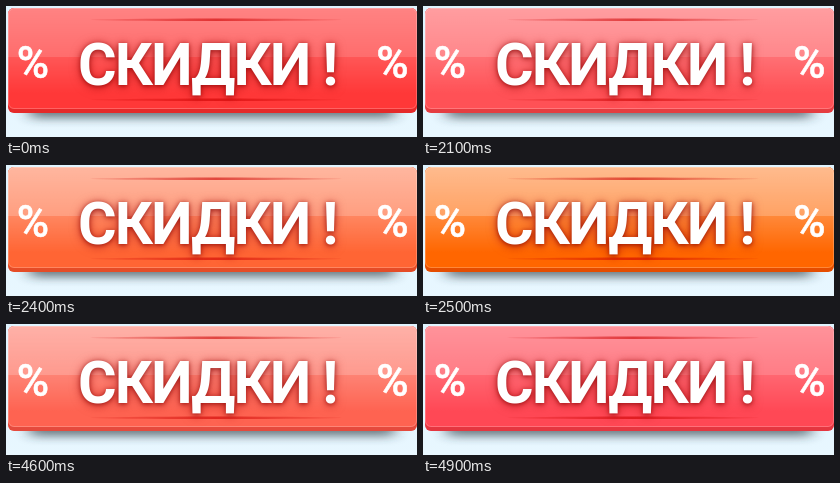
Animation of 411 by 131 pixels, one loop 5 s. Source, as an HTML page:

```html
<!DOCTYPE html>
<html lang="ru">
<head>
<meta charset="utf-8">
<style>
html, body { margin: 0; width: 100%; height: 100%; overflow: hidden; background: #e6f6ff; }
svg { display: block; width: 411px; height: 131px; }
text { font-family: Roboto, sans-serif; font-weight: 700; fill: #fff; }
.title { font-size: 59px; letter-spacing: -1.8px; filter: drop-shadow(0 1px 2px rgba(120, 0, 0, .6)) drop-shadow(0 1px 5px rgba(170, 0, 0, .6)); }
.sign { font-size: 44px; font-weight: 500; text-anchor: middle; stroke: #fff; stroke-width: .6px; }
</style>
</head>
<body>
<svg viewBox="0 0 411 131">
  <defs>
    <linearGradient id="page" x2="0" y2="1">
      <stop stop-color="#e0f4ff"/><stop offset="1" stop-color="#e8f7ff"/>
    </linearGradient>
    <linearGradient id="shine" x2="0" y2="1">
      <stop stop-color="#fff"/><stop offset=".49" stop-color="#fff" stop-opacity=".7"/>
      <stop offset=".49" stop-color="#fff" stop-opacity=".4"/><stop offset=".85" stop-color="#fff" stop-opacity="0"/>
    </linearGradient>
    <linearGradient id="line">
      <stop stop-color="#c00" stop-opacity=".1"/><stop offset=".5" stop-color="#c00" stop-opacity=".6"/>
      <stop offset="1" stop-color="#c00" stop-opacity=".1"/>
    </linearGradient>
    <filter id="soft" x="-10%" y="-150%" width="120%" height="400%"><feGaussianBlur stdDeviation="8 5"/></filter>
  </defs>
  <rect width="411" height="131" fill="url(#page)"/>
  <rect x="24" y="96" width="364" height="16" fill="#25343d" opacity=".65" filter="url(#soft)"/>
  <rect class="face" x="2" y="2" width="409" height="105" rx="6"/>
  <rect x="2" y="2" width="409" height="105" rx="6" fill="#900" opacity=".25"/>
  <rect class="face" x="2" y="2" width="409" height="101" rx="6"/>
  <rect id="gloss" x="2" y="2" width="409" height="101" rx="6" fill="url(#shine)"/>
  <rect x="2.5" y="2.5" width="408" height="100" rx="5.5" fill="none" stroke="#fff" stroke-opacity=".22"/>
  <ellipse cx="210" cy="13.8" rx="126" ry="1.2" fill="url(#line)"/>
  <ellipse cx="210" cy="93.8" rx="126" ry="1.2" fill="url(#line)"/>
  <text class="sign" x="27" y="71.5">%</text>
  <text class="sign" x="386.5" y="71.5">%</text>
  <text class="title" x="72" y="79">СКИДКИ !</text>
</svg>
<script>
const LOOP = 5000;
const shades = ['#ff3838', '#ff4855', '#ff5156', '#ff5b55', '#fe6351', '#ff6534', '#ff6600'];
// [time in ms, shade index]
const steps = [[0, 0], [2000, 1], [2100, 2], [2200, 3], [2300, 4], [2400, 5], [2500, 6],
  [4500, 5], [4600, 4], [4700, 3], [4800, 2], [4900, 1], [LOOP, 0]];

function play(element, styleFor) {
  element.animate(
    steps.map(([time, shade]) => ({ offset: time / LOOP, easing: 'steps(1, end)', ...styleFor(shade) })),
    { duration: LOOP, iterations: Infinity });
}

for (const face of document.querySelectorAll('.face')) play(face, shade => ({ fill: shades[shade] }));
play(document.getElementById('gloss'), shade => ({ opacity: 0.38 + 0.03 * shade }));
</script>
</body>
</html>
```
